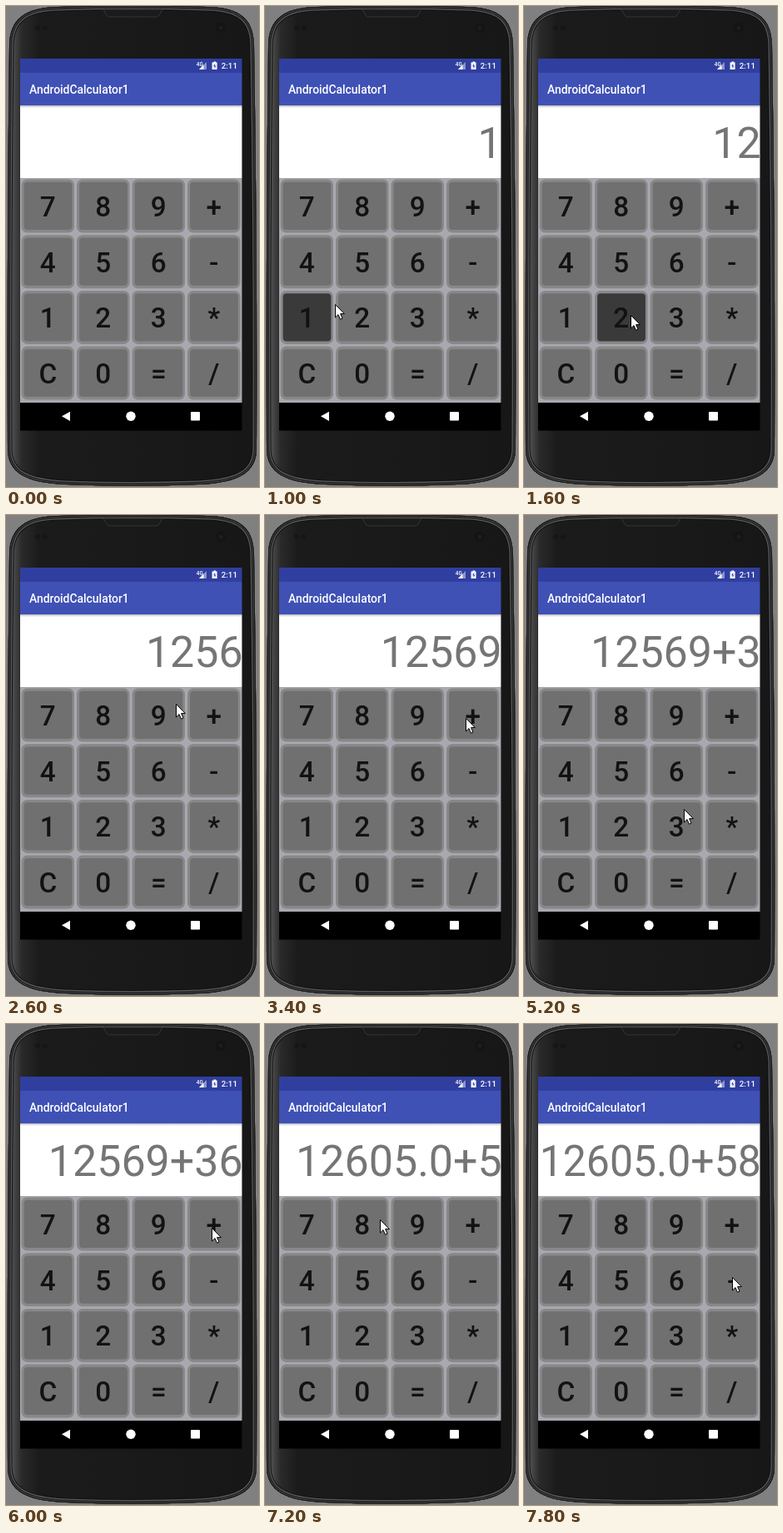
These frames come from a looping animation (304x576 px, 8 s). An HTML page:

```html
<!DOCTYPE html>
<html lang="en">
<head>
<meta charset="utf-8">
<title>Calculator</title>
<style>
html, body { margin: 0; width: 100%; height: 100%; overflow: hidden; background: #808080; }
svg { display: block; width: 304px; height: 576px; }
text { font-family: Roboto, sans-serif; }
.key { font-size: 33.3px; font-weight: 500; text-anchor: middle; fill: #121212; }
.bar { font-weight: 500; fill: #fff; }
#rim use { fill: none; }
</style>
</head>
<body>
<svg viewBox="0 0 304 576" xmlns="http://www.w3.org/2000/svg">
  <defs>
    <path id="body" d="M4 46C5 16 22 2 62 1Q152-2 242 1C282 2 297 16 298 46Q302 290 301 530C301 560 278 571 231 573Q152 576 72 573C25 571 2 560 2 530Q1 290 4 46Z"/>
    <linearGradient id="shell" gradientUnits="userSpaceOnUse" x1="4" y1="0" x2="300" y2="0">
      <stop offset="0" stop-color="#5c5c5c"/>
      <stop offset=".025" stop-color="#424242"/>
      <stop offset=".05" stop-color="#2a2a2a"/>
      <stop offset=".12" stop-color="#1b1b1b"/>
      <stop offset="1" stop-color="#171717"/>
    </linearGradient>
    <linearGradient id="shade" x1="0" y1="0" x2="0" y2="1">
      <stop offset="0" stop-color="#000" stop-opacity=".28"/>
      <stop offset="1" stop-color="#000" stop-opacity="0"/>
    </linearGradient>
    <clipPath id="inside"><use href="#body"/></clipPath>
    <clipPath id="screen"><rect x="17" y="119" width="266.5" height="87"/></clipPath>
  </defs>

  <rect width="304" height="576" fill="#808080"/>
  <use href="#body" fill="url(#shell)"/>
  <g id="rim" clip-path="url(#inside)">
    <use href="#body" stroke="#101010" stroke-width="11"/>
    <use href="#body" stroke="#5a5a5a" stroke-width="9"/>
    <use href="#body" stroke="#222" stroke-width="6.5"/>
    <use href="#body" stroke="#484848" stroke-width="3.5"/>
    <use href="#body" stroke="#141414" stroke-width="2"/>
  </g>
  <path d="M117 4H188L184 11Q183 13 180 13H125Q122 13 121 11Z" fill="#1b1b1b" stroke="#3c3c3c" stroke-width=".8"/>
  <circle cx="258" cy="26" r="6" fill="#141414"/>
  <circle cx="258" cy="26" r="2.5" fill="#1e1e1e"/>
  <circle cx="38" cy="26" r="3" fill="#161616"/>
  <circle cx="47" cy="26" r="3" fill="#161616"/>

  <rect x="17" y="63" width="266.5" height="17" fill="#303f9f"/>
  <rect x="17" y="80" width="266.5" height="39.5" fill="#3f51b5"/>
  <text class="bar" x="28" y="105" font-size="13.9">AndroidCalculator1</text>
  <text class="bar" x="258.8" y="75" font-size="9.7">2:11</text>
  <text class="bar" x="228.8" y="71.6" font-size="6.4">4G</text>
  <path d="M241 67V76H232Z" fill="#fff" opacity=".45"/>
  <path d="M237.5 70.5V76H232Z" fill="#fff"/>
  <g transform="translate(.6 0)">
    <path d="M249 66.5H251.5V67.5H253V76H247V67.5H249Z" fill="#fff"/>
    <path d="M250.8 68.7L248.5 72.3H250V75L251.8 71.4H250.4Z" fill="#303f9f"/>
  </g>

  <rect x="17" y="119" width="266.5" height="87" fill="#fff"/>
  <rect x="17" y="119" width="266.5" height="3" fill="url(#shade)"/>
  <g clip-path="url(#screen)"><text id="display" y="182.4" font-size="52" fill="#757575"></text></g>

  <rect x="17" y="206" width="266.5" height="269" fill="#a9a8b0"/>
  <g id="keys"></g>

  <rect x="17" y="475" width="266.5" height="33.5" fill="#000"/>
  <path d="M67 491.3L77 485.7V497Z" fill="#fff"/>
  <circle cx="150" cy="491.3" r="5.7" fill="#fff"/>
  <rect x="222" y="486" width="11" height="10.6" rx="1" fill="#fff"/>

  <path id="cursor" d="M.5.5V16L4 12.6L6.5 18.2L9 17.1L6.6 11.6H11.4Z" fill="#fff" stroke="#000" stroke-width="1"/>
</svg>
<script>
const LOOP = 8000, STEP = 200;
const LEFT = 16, RIGHT = 284.8;
const LABELS = '789+456-123*C0=/';
const $ = id => document.getElementById(id);

// [time, shown text]
const entries = [
  [0, ''], [1000, '1'], [1600, '12'], [2000, '125'], [2400, '1256'],
  [3000, '12569'], [4400, '12569+'], [5000, '12569+3'], [5600, '12569+36'],
  [6200, '12605.0+'], [6800, '12605.0+5'], [7400, '12605.0+58']
];
// [from, until, key]
const presses = [
  [800, 1200, '1'], [1400, 1800, '2'], [2400, 2600, '6'],
  [2800, 3200, '9'], [4400, 4600, '+'], [7400, 7600, '8']
];
// [time, x, y]
const route = [
  [200, 150, 340], [600, 62, 376], [800, 66, 372], [1000, 84, 357],
  [1200, 124, 366], [1600, 128, 370], [2000, 128, 312], [2400, 192, 317],
  [2600, 204, 226], [3000, 202, 238], [3600, 260, 246], [4400, 260, 245],
  [4800, 194, 358], [5000, 190, 361], [5200, 192, 352], [5600, 194, 310],
  [6000, 247, 244], [6400, 246, 244], [6800, 130, 308], [7200, 138, 234],
  [7400, 136, 238], [7600, 206, 330], [7800, 250, 303]
];

function make(tag, attrs, text = '') {
  const el = document.createElementNS('http://www.w3.org/2000/svg', tag);
  for (const name in attrs) el.setAttribute(name, attrs[name]);
  el.textContent = text;
  $('keys').append(el);
  return el;
}

const faces = {};
[...LABELS].forEach((label, i) => {
  const x = 17 + i % 4 * 66.5, y = 206 + Math.floor(i / 4) * 66.7;
  make('rect', { x: x + 1.5, y: y + 1.5, width: 63.5, height: 64, rx: 7, fill: '#888' });
  faces[label] = make('rect', { x: x + 4.6, y: y + 4.8, width: 57.8, height: 57.2, rx: 4 });
  make('text', { class: 'key', x: x + 33.3, y: y + 45.8 }, label);
});

const latest = (list, t) => list.filter(item => item[0] <= t).pop();

function cursorAt(t) {
  const a = latest(route, t);
  const b = route[route.indexOf(a) + 1] || a;
  const k = a === b ? 0 : (t - a[0]) / (b[0] - a[0]);
  return [1, 2].map(i => Math.round(a[i] + (b[i] - a[i]) * k));
}

function showText(value) {
  const el = $('display');
  if (el.textContent !== value) el.textContent = value;
  const width = value ? el.getComputedTextLength() : 0;
  const room = RIGHT - LEFT;
  // A line slightly too long is condensed, as the platform's text view does
  const scale = width > room ? 1 - (width + 1 - room) / room - .005 : 1;
  el.setAttribute('transform', `translate(${RIGHT - width * scale} 0) scale(${scale} 1)`);
}

function render(time) {
  const t = Math.floor(time % LOOP / STEP) * STEP;
  showText(latest(entries, t)[1]);
  for (const label in faces) {
    const down = presses.some(([from, until, key]) => key === label && t >= from && t < until);
    faces[label].setAttribute('fill', down ? '#3a3a3a' : '#707070');
  }
  const visible = t >= route[0][0];
  $('cursor').setAttribute('visibility', visible ? 'visible' : 'hidden');
  if (visible) $('cursor').setAttribute('transform', `translate(${cursorAt(t)})`);
}

const start = performance.now();
function tick() {
  render(performance.now() - start);
  requestAnimationFrame(tick);
}
tick();
</script>
</body>
</html>
```
